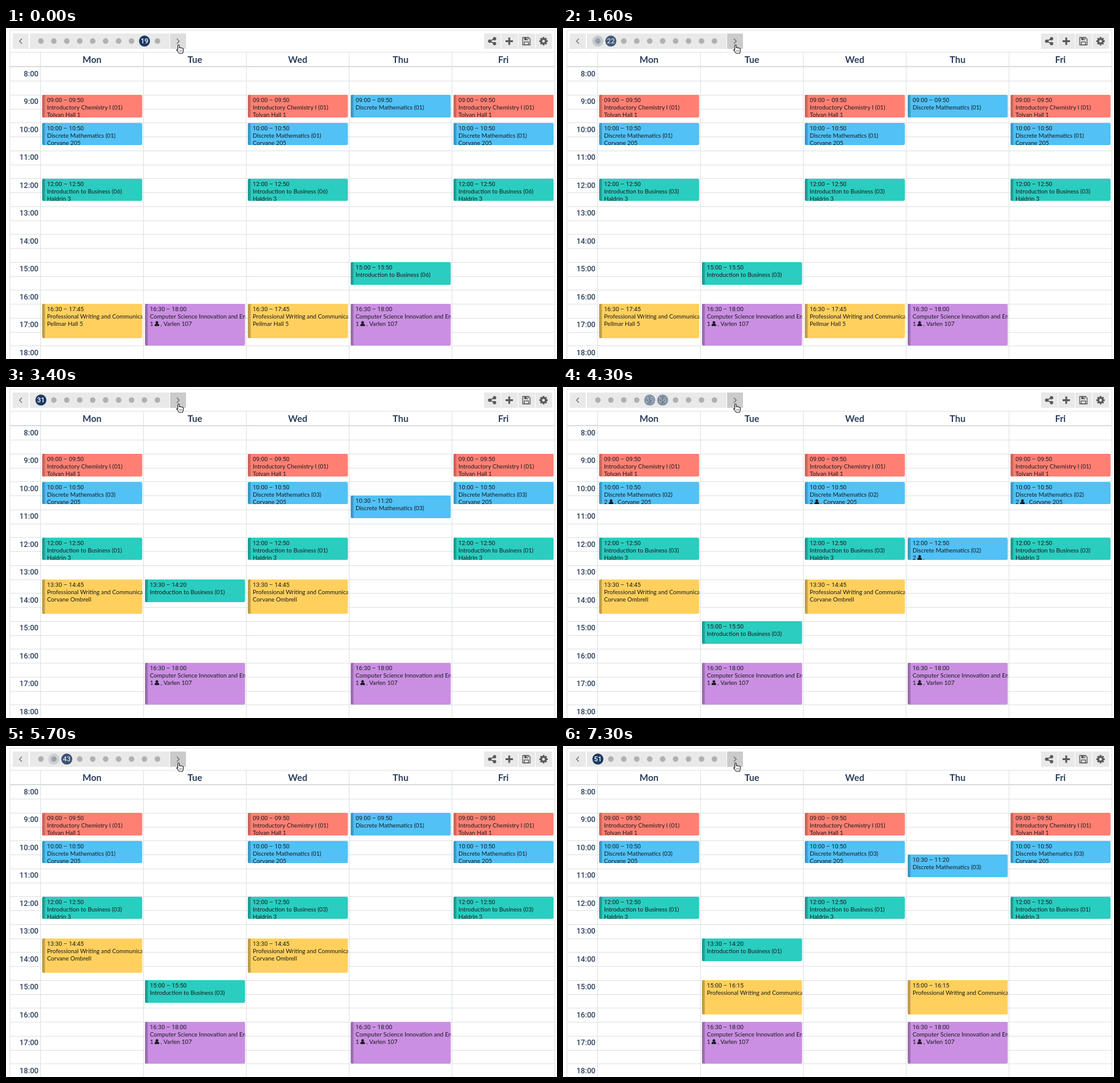
An HTML page with a canvas for the animation above (7400 ms loop, 900 px wide and 540 px high).

```html
<!DOCTYPE html>
<html lang="en">
<head>
<meta charset="utf-8">
<title>Timetable</title>
<style>
  html, body { margin: 0; width: 100%; height: 100%; overflow: hidden; background: #fff; }
  canvas { display: block; width: 900px; height: 540px; }
</style>
</head>
<body>
<canvas id="stage" width="900" height="540"></canvas>
<script>
const ctx = document.getElementById('stage').getContext('2d');
const LOOP = 7400, FADE = 100, FIRST = 19, LAST = 51;
const WORDS = 'Lato, sans-serif', DIGITS = 'Roboto, sans-serif';
const NAVY = '#2c3f5c', INK = '#17191d', ICON = '#585858', LINE = '#dde1e3';
const DAYS = ['Mon', 'Tue', 'Wed', 'Thu', 'Fri'];
const MWF = [0, 2, 4], MW = [0, 2], TUTH = [1, 3];

const COLORS = {
  red: ['#ff8073', '#cb665d'],
  blue: ['#51c1f6', '#3c98c4'],
  teal: ['#2acdbf', '#209c92'],
  yellow: ['#ffd05d', '#c09d49'],
  purple: ['#ca8fe2', '#9a6dad']
};

// Pairs of schedule number and click time; clicks between are evenly spaced.
const CLICKS = [[20, 1130], [22, 1520], [27, 2535], [31, 3270], [36, 4250], [43, 5615], [51, 7160]];

// Discussion slot of each section: day, start hour.
const MATH = { 1: [3, 9], 2: [3, 12], 3: [3, 10.5] };
const BUSINESS = {
  1: [1, 13.5], 2: [1, 13.5], 3: [1, 15], 4: [3, 13.5],
  5: [3, 13.5], 6: [3, 15], 7: [4, 13.5], 8: [2, 13.5]
};
const WRITING = {
  late: [MW, 16.5, 'Pellmar Hall 5'],
  noon: [MW, 13.5, 'Corvane Ombrell'],
  mid: [TUTH, 15, '']
};

const colX = day => 57 + 168 * day;
const hourY = h => 109.3 + 45.5 * (h - 9);
const snapY = h => Math.floor(hourY(h) + 0.25);
const pad = n => String(n).padStart(2, '0');
const clock = h => pad(Math.floor(h + 1e-6)) + ':' + pad(Math.round(h * 60) % 60);

function clickTime(n) {
  for (let i = 1; i < CLICKS.length; i++) {
    const [a, ta] = CLICKS[i - 1], [b, tb] = CLICKS[i];
    if (n <= b) return ta + (tb - ta) * (n - a) / (b - a);
  }
}

function sections(n) {
  if (n < 25) return { math: 1, biz: 25 - n, writing: 'late' };
  if (n < 46) {
    const k = n - 25;
    return { math: 3 - Math.floor(k / 7), biz: 7 - k % 7, writing: 'noon' };
  }
  return { math: 3, biz: [8, 7, 5, 4, 2, 1][n - 46], writing: 'mid' };
}

function text(s, x, y, font, color, align = 'left') {
  ctx.font = font;
  ctx.textAlign = align;
  ctx.fillStyle = color;
  ctx.fillText(s, x, y);
}

function box(x, y, w, h, color) {
  ctx.fillStyle = color;
  ctx.fillRect(x, y, w, h);
}

function disc(x, y, r, color) {
  ctx.fillStyle = color;
  ctx.beginPath();
  ctx.arc(x, y, r, 0, 7);
  ctx.fill();
}

function stroke(points, color, width) {
  ctx.strokeStyle = color;
  ctx.lineWidth = width;
  ctx.beginPath();
  points.forEach(([x, y], i) => i ? ctx.lineTo(x, y) : ctx.moveTo(x, y));
  ctx.stroke();
}

function person(x, y) {
  disc(x + 3.8, y - 5.6, 2.2, INK);
  ctx.beginPath();
  ctx.roundRect(x, y - 3.6, 7.6, 3.8, [2.5, 2.5, 1, 1]);
  ctx.fill();
}

function event(day, start, length, color, title, place, people) {
  const x = colX(day) + 2, y = snapY(start), h = snapY(start + length) - 1 - y;
  const [fill, edge] = COLORS[color];
  ctx.save();
  ctx.beginPath();
  ctx.roundRect(x, y, 163.5, h, 2.5);
  ctx.clip();
  box(x, y, 164, h, fill);
  box(x, y, 4.5, h, edge);
  const left = x + 8, base = y + 11.5, font = '9.7px ' + WORDS;
  text(`${clock(start)} – ${clock(start + length)}`, left, base, '9.8px ' + DIGITS, INK);
  text(title, left, base + 12.3, font, INK);
  if (people) {
    text(people, left, base + 24.6, font, INK);
    person(left + 7.7, base + 24.6);
    text(`, ${place}`, left + 17.6, base + 24.6, font, INK);
  } else {
    text(place, left, base + 24.6, font, INK);
  }
  ctx.restore();
}

function schedule(n) {
  const { math, biz, writing } = sections(n);
  const hour = 5 / 6;
  const maths = `Discrete Mathematics (0${math})`;
  const business = `Introduction to Business (0${biz})`;
  const people = math === 2 ? '2' : '';
  for (const d of MWF) {
    event(d, 9, hour, 'red', 'Introductory Chemistry I (01)', 'Tolvan Hall 1');
    event(d, 10, hour, 'blue', maths, 'Corvane 205', people);
    event(d, 12, hour, 'teal', business, 'Haldrin 3');
  }
  event(...MATH[math], hour, 'blue', maths, '', people);
  event(...BUSINESS[biz], hour, 'teal', business, '');
  const [days, start, place] = WRITING[writing];
  for (const d of days) event(d, start, 1.25, 'yellow', 'Professional Writing and Communication', place);
  for (const d of TUTH) event(d, 16.5, 1.5, 'purple', 'Computer Science Innovation and Entrepreneurship', 'Varlen 107', '1');
}

function grid() {
  const row = y => box(6, y, 891, 1, LINE);
  row(3);
  row(39);
  box(6, 62, 891, 2, '#d9dddf');
  for (let h = 8.5; h <= 18; h += 0.5) row(Math.floor(hourY(h)));
  box(6, 3, 1, 537, LINE);
  box(896, 3, 1, 537, LINE);
  DAYS.forEach((day, i) => {
    box(colX(i) - 1, 39, 1, 501, LINE);
    text(day, colX(i) + 83.5, 57.3, '700 15px ' + WORDS, NAVY, 'center');
  });
  for (let h = 8; h <= 18; h++) text(`${h}:00`, 53, hourY(h) + 15, '500 12.2px ' + DIGITS, NAVY, 'right');
}

function chevron(x, dir) {
  stroke([[x - 2 * dir, 17.5], [x + 2 * dir, 21.5], [x - 2 * dir, 25.5]], '#6a6a6a', 1.2);
}

function shareIcon(x, y) {
  stroke([[x + 4, y - 4], [x - 4, y], [x + 4, y + 4]], ICON, 1.7);
  for (const [dx, dy] of [[4, -4], [-4, 0], [4, 4]]) disc(x + dx, y + dy, 2.7, ICON);
}

function plusIcon(x, y) {
  box(x - 6, y - 1.5, 12, 3, ICON);
  box(x - 1.5, y - 6, 3, 12, ICON);
}

function saveIcon(x, y) {
  stroke([[x - 6, y - 6], [x + 3.5, y - 6], [x + 6, y - 3.5], [x + 6, y + 6], [x - 6, y + 6], [x - 6, y - 6.6]], ICON, 1.3);
  box(x - 3.5, y - 6, 6.5, 4.5, ICON);
  box(x + 0.6, y - 5.4, 1.4, 3, '#eee');
  ctx.strokeStyle = ICON;
  ctx.strokeRect(x - 3.5, y + 1.2, 7, 4.8);
}

function gearIcon(x, y, hole) {
  ctx.save();
  ctx.translate(x, y);
  ctx.fillStyle = ICON;
  for (let i = 0; i < 8; i++) {
    ctx.fillRect(-1.5, -6.8, 3, 4);
    ctx.rotate(Math.PI / 4);
  }
  ctx.restore();
  disc(x, y, 5.1, ICON);
  disc(x, y, 2.2, hole);
}

function marker(n, alpha) {
  const x = 57 + 21.15 * ((n - 1) % 10);
  ctx.globalAlpha = alpha;
  disc(x, 21.3, 9, '#1b3a63');
  text(n, x, 25.2, '500 11px ' + DIGITS, '#fff', 'center');
  ctx.globalAlpha = 1;
}

function toolbar(n, fade, pressed) {
  const gray = '#e9e9e9';
  box(11, 9, 26, 25, gray);
  box(39, 9, 228, 25, gray);
  box(268, 9, 26, 25, pressed ? '#cbcbcb' : '#dcdcdc');
  chevron(24, -1);
  chevron(281, 1);
  for (let i = 0; i < 10; i++) disc(57 + 21.15 * i, 21.3, 4.5, '#b0b0b0');
  if (fade < 1) marker(n - 1, 1 - fade);
  marker(n, fade);
  for (const x of [781, 809, 837, 865]) box(x, 9, 27, 25, gray);
  shareIcon(794, 21.5);
  plusIcon(822, 21.5);
  saveIcon(850, 21.5);
  gearIcon(878, 21.5, gray);
}

function hand() {
  ctx.save();
  ctx.translate(278, 27);
  const outline = new Path2D('M2.6 9V1.8Q2.6.5 3.8.5T5 1.8V5.2Q6.2 4.4 7.2 5.5Q8.4 4.8 9.3 6Q11.6 5.6 11.6 7.6V10Q11.6 12 10.5 14.2H4.6Q3.8 11.8.7 9.1Q.2 7.6 2.6 8.2Z');
  ctx.fillStyle = '#fff';
  ctx.fill(outline);
  ctx.strokeStyle = '#222';
  ctx.lineWidth = 1.1;
  ctx.lineJoin = 'round';
  ctx.stroke(outline);
  for (const x of [5.6, 7.4, 9.2]) stroke([[x, 9], [x, 11.8]], '#555', 0.7);
  ctx.restore();
}

function draw(t) {
  let n = FIRST;
  while (n < LAST && t >= clickTime(n + 1)) n++;
  const fade = n === FIRST ? 1 : Math.min(1, (t - clickTime(n)) / FADE);
  box(0, 0, 900, 540, '#fff');
  grid();
  schedule(n);
  toolbar(n, fade, n > FIRST);
  hand();
}

const begin = performance.now();
function tick() {
  draw((performance.now() - begin) % LOOP);
  requestAnimationFrame(tick);
}
tick();
</script>
</body>
</html>
```
